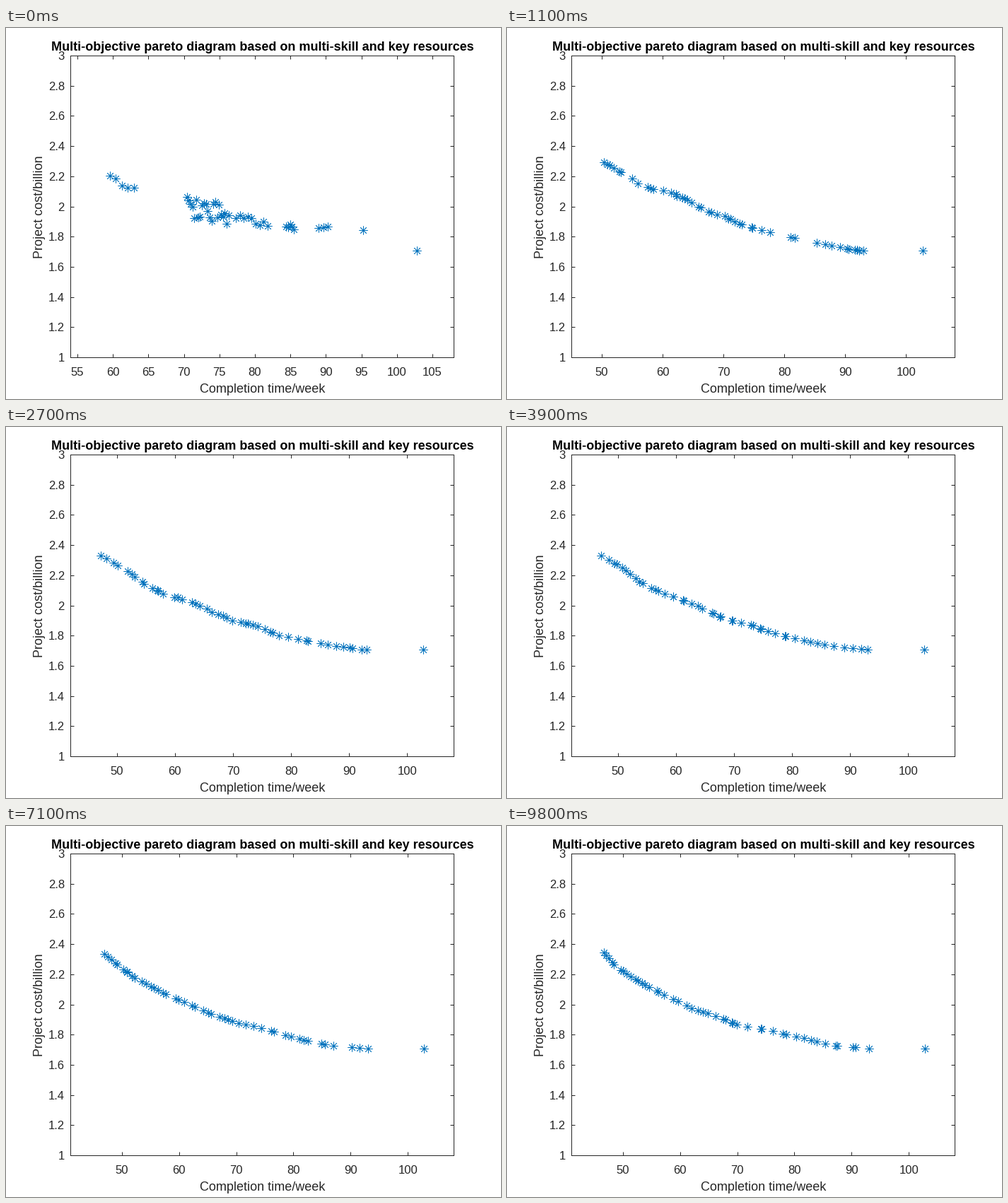
A matplotlib script for the animation above (10 s loop, 700 by 525 pixels).

```python
import numpy as np
import matplotlib.pyplot as plt
from matplotlib.animation import FuncAnimation

plt.rcParams["font.family"] = "Liberation Sans"

W, H, DPI = 700, 525, 100
PX = 72 / DPI                 # points per pixel
INK, BLUE = "#262626", "#0072BD"
FRAMES, LAST_GEN = 100, 98
N = 46                        # solutions on the front
HOLD = 6                      # generations a solution survives
SETTLED = 11                  # generation at which the front has formed
CHEAPEST = (102.8, 1.706)

rng = np.random.default_rng(7)
ranks = np.arange(N)
phase = rng.integers(0, HOLD, N)
jitter = rng.uniform(-0.5, 0.5, (LAST_GEN // HOLD + 2, N))
jitter[:, [0, -1]] = 0
pace = rng.uniform(0.5, 1, N)

# Key points of the front, evenly spaced by rank, at four generations.
KEY_GENS = [11, 27, 58, 98]
KEY_TIMES = np.array([
    [50.3, 52.7, 57.3, 61.8, 63.7, 66.6, 70.3, 72.6, 77, 86.5, 91.2, 93],
    [47.25, 52, 54.9, 58.7, 63.2, 66.6, 70.5, 74.8, 78, 83.5, 88.3, 93],
    [47.05, 49.7, 52.2, 55.2, 58.3, 63, 65.7, 70.7, 74.9, 79.7, 85.4, 93],
    [46.65, 48.7, 51.6, 54.1, 57.8, 62.2, 67.1, 69.9, 76.1, 81.6, 86.2, 93]])
KEY_COSTS = np.array([
    [2.295, 2.24, 2.13, 2.087, 2.05, 1.985, 1.935, 1.884, 1.833, 1.75, 1.716,
     1.706],
    [2.331, 2.228, 2.135, 2.064, 2.02, 1.953, 1.892, 1.858, 1.799, 1.762,
     1.727, 1.706],
    [2.331, 2.263, 2.182, 2.125, 2.063, 1.992, 1.936, 1.884, 1.842, 1.777,
     1.734, 1.706],
    [2.345, 2.254, 2.179, 2.123, 2.053, 1.973, 1.912, 1.866, 1.823, 1.777,
     1.73, 1.706]])
KEY_RANKS = np.linspace(0, N - 1, KEY_TIMES.shape[1])

CLUSTERS = [  # time from, to, cost from, to, spread, count
    (59.55, 62.95, 2.2, 2.12, 0.03, 5),
    (70.4, 76.3, 2.0, 1.95, 0.07, 23),
    (77.3, 81.8, 1.94, 1.87, 0.025, 9),
    (84.4, 85.5, 1.875, 1.86, 0.012, 5),
    (89, 90.3, 1.858, 1.865, 0.005, 3),
    (95.2, 95.2, 1.842, 1.842, 0, 1)]


def scattered():
    parts = []
    for t0, t1, c0, c1, spread, n in CLUSTERS:
        noise = rng.uniform(-spread, spread, n)
        parts.append([np.linspace(t0, t1, n), np.linspace(c0, c1, n) + noise])
    return np.hstack(parts)


def front(rank, gen):
    """Time and cost at one rank of the front."""
    def value(keys):
        curves = [np.interp(rank, KEY_RANKS, row) for row in keys]
        return np.interp(gen, KEY_GENS, curves)
    return value(KEY_TIMES), value(KEY_COSTS)


def settled(gen):
    """Solutions stay put, then hop to a new spot on the improving front."""
    epoch = (gen + phase) // HOLD
    born = np.clip(epoch * HOLD - phase + HOLD / 2, SETTLED, LAST_GEN)
    born[0] = gen
    spots = ranks + jitter[epoch, ranks]
    return np.array([front(r, g) for r, g in zip(spots, born)]).T


start = scattered()
formed = settled(SETTLED)


def population(gen):
    if gen < SETTLED:
        pts = start + (formed - start) * (gen / SETTLED) ** pace
    else:
        pts = settled(gen)
    return np.column_stack([pts, CHEAPEST])


fig = plt.figure(figsize=(W / DPI, H / DPI), dpi=DPI, facecolor="white")
ax = fig.add_axes([91 / W, 1 - 466 / H, 542 / W, 427 / H])
ax.set_ylim(1, 3)
ax.set_yticks(np.arange(1, 3.1, 0.2))
ax.yaxis.set_major_formatter("{x:g}")
ax.tick_params(direction="in", top=True, right=True, length=5.4 * PX,
               width=PX, color=INK, labelcolor=INK, labelsize=16.67 * PX)
ax.tick_params(axis="x", pad=13.5 * PX)
ax.tick_params(axis="y", pad=8 * PX)
for spine in ax.spines.values():
    spine.set(color=INK, linewidth=PX)


def label(x, y, text, **style):
    fig.text(x / W, 1 - y / H, text, ha="center", fontsize=18 * PX, **style)


label(362.5, 32, "Multi-objective pareto diagram based on "
      "multi-skill and key resources", weight="bold", color="black",
      va="baseline")
label(362.5, 516, "Completion time/week", color=INK, va="baseline")
label(48, 253.5, "Project cost/billion", color=INK, va="center", rotation=90)

stars, = ax.plot([], [], ls="none", marker=(8, 2, 0), ms=12 * PX,
                 mew=0.8 * PX, color=BLUE, clip_on=False)


def draw(frame):
    x, y = population(min(frame, LAST_GEN))
    lo, hi = np.floor(x.min()) - 5, np.ceil(x.max()) + 5
    step = 5 if hi - lo < 60 else 10
    ax.set_xlim(lo, hi)
    ax.set_xticks(np.arange(np.ceil(lo / step) * step, hi, step))
    stars.set_data(x, y)
    return stars,


anim = FuncAnimation(fig, draw, frames=FRAMES, interval=100, repeat=True,
                     repeat_delay=0, blit=False)
plt.show()
```
